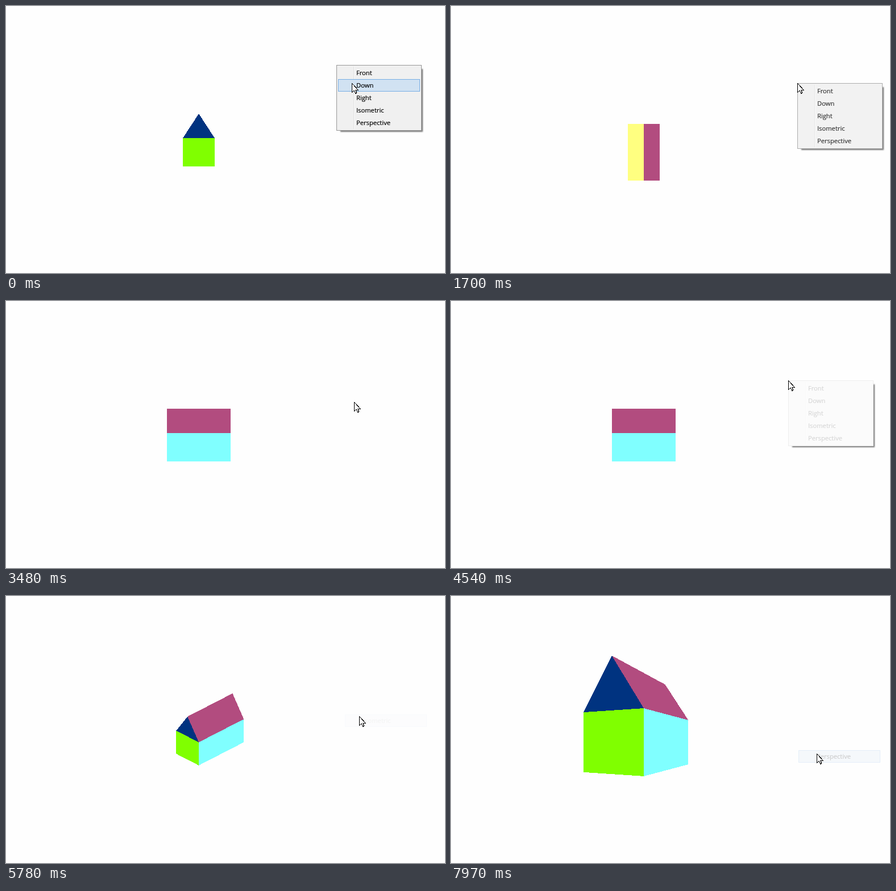
An HTML page that plays this animation: 772x471 px, repeating every 8 s.

```html
<!DOCTYPE html>
<html lang="en">
<head>
<meta charset="utf-8">
<title>House views</title>
<style>
  html, body { margin: 0; width: 100%; height: 100%; overflow: hidden; background: #fefefe; }
  svg, #menu { position: absolute; left: 0; top: 0; shape-rendering: crispEdges; }
  #menu { width: 150px; height: 116px; }
  #shadow { position: absolute; inset: 5px 0 0 5px; box-shadow: 2px 2px 2px rgba(0, 0, 0, .52); }
  #panel {
    position: absolute; inset: 0; box-sizing: border-box;
    border: 1px solid #979797; background: #f0f0f0;
    font: 11.2px/20px "Open Sans", "Noto Sans", sans-serif; color: #000;
    -webkit-text-stroke: .2px #000;
  }
  #panel::before {
    content: ""; position: absolute; left: 29px; top: 2px; bottom: 2px; width: 1px;
    background: #e0e0e0; box-shadow: 1px 0 #fafafa;
  }
  .item {
    position: relative; top: 2px; left: 2px; box-sizing: border-box;
    width: 144px; height: 22px; padding-left: 31px;
    border: 1px solid transparent; white-space: nowrap;
  }
  .hot { background: #d1e2f2; border-color: #78aee5; }
  .closed { visibility: hidden; }
  .closed .hot { visibility: visible; }
</style>
</head>
<body>
<svg id="house" width="772" height="471"></svg>
<div id="menu">
  <div id="shadow"></div>
  <div id="panel"></div>
</div>
<svg id="cursor" width="14" height="20">
  <path d="M.5 .5V16.5L4.1 13.2L6.5 18.4L8.9 17.4L6.6 12.3H11.4Z" fill="#fff" stroke="#000"/>
</svg>
<script>
const LOOP = 8000, ROW = 22, LAG = 45, FADE = 260;
const CX = 339, CY = 258, ASPECT = 1.12, FOCAL = 402;
const $ = id => document.getElementById(id);

// The house is a gable outline pushed along z.
const outline = [[-25, -25], [-25, 25], [0, 68], [25, 25], [25, -25]];
const at = (i, z) => [...outline[i], z];
const side = i => [at(i, 50), at(i, -50), at(i + 1, -50), at(i + 1, 50)];
const front = (...ids) => ids.map(i => at(i, 50));
const faces = [
  ['#ffff80', side(1)],
  ['#b24c7f', side(2)],
  ['#80ffff', side(3)],
  ['#80ff00', front(0, 1, 3, 4)],
  ['#003380', front(1, 2, 3)]
];

// shift moves the house along z, dist makes the view a perspective
const views = {
  Front: {},
  Down: { pitch: Math.PI / 2 },
  Right: { yaw: Math.PI / 2 },
  Isometric: { yaw: Math.PI / 4, pitch: Math.atan(Math.SQRT1_2), shift: -25 },
  Perspective: { yaw: Math.atan(.5), dist: Math.hypot(100, 200), delay: 110 }
};
const names = Object.keys(views);

function project([x, y, z], { yaw = 0, pitch = 0, shift = 0, dist }) {
  z += shift;
  const u = x * Math.cos(yaw) - z * Math.sin(yaw);
  const w = x * Math.sin(yaw) + z * Math.cos(yaw);
  const v = y * Math.cos(pitch) - w * Math.sin(pitch);
  const near = y * Math.sin(pitch) + w * Math.cos(pitch);
  const s = dist ? FOCAL / (dist - near) : 1;
  return [CX + u * s * ASPECT, CY - v * s];
}

// Positive when the face looks at the viewer
const area = pts => pts.reduce((sum, [x, y], i) => {
  const [nx, ny] = pts[(i + 1) % pts.length];
  return sum + x * ny - nx * y;
}, 0);

function houseSvg(view) {
  return faces.map(([color, pts]) => [color, pts.map(p => project(p, view))])
    .filter(([, pts]) => area(pts) > 1)
    .map(([color, pts]) => `<polygon fill="${color}" points="${pts.join(' ')}"/>`)
    .join('');
}

// Each visit opens the menu at the cursor and picks a view.
const visits = [
  { open: -1000, click: 340, pick: 'Down' },
  { open: 1610, click: 2900, pick: 'Right' },
  { open: 4540, click: 5530, pick: 'Isometric' },
  { open: 6500, click: 7650, pick: 'Perspective' }
];

// start, end, x, y
const origin = [581, 104];
const moves = [
  [-900, -60, 608, 136], [59, 60, 609, 136], [1880, 2330, 635, 190],
  [3440, 3780, 563, 152], [3780, 4020, 582, 139], [4300, 4370, 593, 140],
  [4690, 5130, 621, 212], [6030, 6300, 608, 181], [6690, 7150, 643, 278]
];

const clamp = v => Math.min(1, Math.max(0, v));
const easeOut = u => 1 - (1 - u) ** 3;

function cursorAt(t) {
  let [x, y] = origin;
  for (const [from, to, mx, my] of moves) {
    const k = easeOut(clamp((t - from) / (to - from)));
    x += (mx - x) * k;
    y += (my - y) * k;
  }
  return [Math.round(x), Math.round(y)];
}

const place = (el, [x, y]) => el.style.transform = `translate(${x}px, ${y}px)`;

$('house').innerHTML = names.map(n => `<g>${houseSvg(views[n])}</g>`).join('');
$('panel').innerHTML = names.map(n => `<div class="item">${n}</div>`).join('');
const groups = [...$('house').children], items = [...$('panel').children];

function draw(t) {
  const visit = visits.filter(v => v.open <= t).pop();
  const corner = cursorAt(visit.open);
  const closed = t >= visit.click;
  const { delay = 0 } = views[visit.pick];
  const hot = closed ? names.indexOf(visit.pick)
    : Math.floor((cursorAt(t - LAG)[1] - corner[1] - 3) / ROW);

  place($('cursor'), cursorAt(t));
  place($('menu'), corner);
  $('shadow').style.display = closed ? 'none' : 'block';
  $('panel').className = closed ? 'closed' : '';
  $('panel').style.opacity = closed
    ? 1 - clamp((t - visit.click - delay) / FADE)
    : clamp(.15 + .2125 * Math.floor((t - visit.open) / 30));
  items.forEach((el, i) => el.classList.toggle('hot', i === hot));

  const last = visits.filter(v => v.click <= t).pop();
  const shown = names.indexOf(last ? last.pick : 'Front');
  groups.forEach((g, i) => g.style.display = i === shown ? '' : 'none');
}

const start = performance.now();
function tick() {
  draw((performance.now() - start) % LOOP);
  requestAnimationFrame(tick);
}
tick();
</script>
</body>
</html>
```
